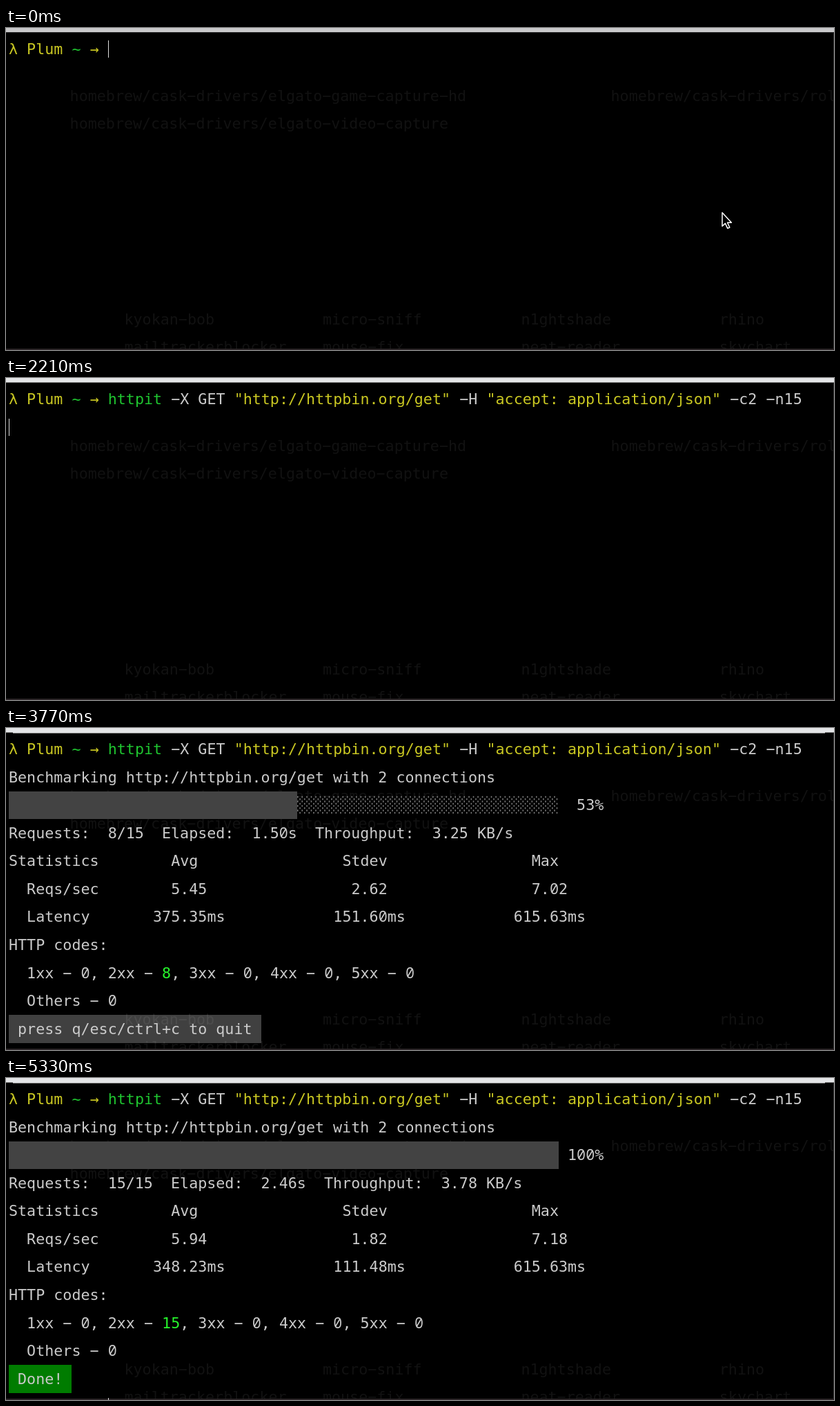
An HTML page that plays this animation: 1200x467 px, repeating every 5590 ms.

```html
<!DOCTYPE html>
<html lang="en">
<head>
<meta charset="utf-8">
<title>Terminal benchmark</title>
<style>
html, body { margin: 0; width: 100%; height: 100%; overflow: hidden; background: #000; }
#stage {
  position: relative; width: 1200px; height: 467px; overflow: hidden; background: #000;
  color: #cbcbcb; font: 21.7px/40.575px "DejaVu Sans Mono", monospace;
  font-variant-ligatures: none;
}
#stage div, svg { position: absolute; }
.cell { white-space: pre; }
.cell i { font: 21.775px/0 "Noto Sans Mono", monospace; }
.ghost { color: #111; }
.yellow { color: #c9c722; }
.green { color: #1fc430; }
.bright { color: #27f52c; }
.shade { color: #777; }
.fill { background: #434343; }
.hint { background: rgba(255, 255, 255, .25); }
.done { background: #007c00; }
.caret { width: 1px; background: #ddd; }
#top { left: 0; top: 0; width: 1200px; height: 6px; background: #c9c9cb; border-bottom: 1px solid #222; }
#top.lit { background: #e4e5e7; border-color: #777; }
#lip { left: 10px; top: 6px; width: 1177px; height: 1px; background: #e4e5e7; border-bottom: 1px solid #777; }
#right { right: 0; top: 7px; width: 1px; height: 460px; background: #333; }
#bottom { left: 0; bottom: 0; width: 1200px; height: 2px; background: #2a2426; }
</style>
</head>
<body>
<div id="stage">
  <div id="back"></div>
  <div id="right"></div>
  <div id="bottom"></div>
  <div id="screen"></div>
  <div id="top"></div>
  <div id="lip"></div>
  <svg width="1200" height="467" fill="none" stroke-linejoin="round">
    <defs>
      <path id="bar" d="M1033.4 259H1035.3Q1038 259 1038 261.5V276.5Q1038 279 1035.3 279H1033.4M1042.6 259H1040.7Q1038 259 1038 261.5M1042.6 279H1040.7Q1038 279 1038 276.5M1035.8 270.5H1040.2"/>
    </defs>
    <path id="arrow" d="M1038 267.8V287.5L1042.4 283.4L1045.8 290.6L1048.8 289.2L1045.5 282.2H1051.4Z"
      fill="#000" stroke="#fff" stroke-width="1.5"/>
    <g id="beam">
      <use href="#bar" stroke="#fff" stroke-width="4"/>
      <use href="#bar" stroke="#000" stroke-width="1.6"/>
    </g>
  </svg>
</div>
<script>
const LOOP = 5590, CW = 13.0655, CH = 40.575, X0 = 4, Y0 = 10.45;
const TOTAL = 15, BAR = 61;
const $ = id => document.getElementById(id);
const colX = c => X0 + c * CW;
const rowY = r => Y0 + r * CH;

// Long hyphens and slashed zeros
const glyphs = s => s.replace(/-/g, '\u2212').replace(/0/g, '<i>0</i>');
const put = (x, y, s, cls = '') =>
  `<div class="cell ${cls}" style="left:${x}px;top:${y}px">${glyphs(s)}</div>`;
const text = (r, c, s, cls) => put(colX(c), rowY(r) + .5, s, cls);
const box = (r, c, n, cls) =>
  `<div class="${cls}" style="left:${colX(c)}px;top:${rowY(r)}px;width:${n * CW}px;height:${CH}px"></div>`;
const caret = (r, c) =>
  `<div class="caret" style="left:${colX(c) + .3}px;top:${rowY(r) + 7.6}px;height:25px"></div>`;

function run(parts, r, c = 0) {
  return parts.map(([s, cls]) => {
    const html = text(r, c, s, cls);
    c += s.length;
    return html;
  }).join('');
}

const prompt = [['λ Plum ', 'yellow'], ['~ ', 'green'], ['→ ', 'yellow']];
const command = [['httpit', 'green'], [' -X GET '], ['"http://httpbin.org/get"', 'yellow'],
  [' -H '], ['"accept: application/json"', 'yellow'], [' -c2 -n15']];

// Three values centred on columns 20, 40 and 60
const columns = (r, label, values) => text(r, 0, label) +
  values.map((v, i) => text(r, Math.floor(20 * (i + 1) - v.length / 2), v)).join('');

function report({ n, sec, rate, reqs, lat, done }) {
  const full = Math.floor(BAR * n / TOTAL);
  const pct = Math.round(100 * n / TOTAL) + '%';
  const codes = [1, 2, 3, 4, 5].flatMap(k => [
    [`${k > 1 ? ', ' : '  '}${k}xx - `],
    k === 2 && n ? [String(n), 'bright'] : ['0']
  ]);
  const foot = done ? ' Done! ' : ' press q/esc/ctrl+c to quit ';
  return text(1, 0, 'Benchmarking http://httpbin.org/get with 2 connections') +
    (full ? box(2, 0, full, 'fill') : '') +
    text(2, full, '░'.repeat(BAR - full), 'shade') +
    text(2, 62, pct.padStart(4)) +
    text(3, 0, `Requests:  ${n}/${TOTAL}  Elapsed:  ${sec}s  Throughput:  ${rate}/s`) +
    columns(4, 'Statistics', ['Avg', 'Stdev', 'Max']) +
    columns(5, '  Reqs/sec', reqs.split(' ')) +
    columns(6, '  Latency', lat.split(' ').map(v => v + 'ms')) +
    text(7, 0, 'HTTP codes:') +
    run(codes, 8) +
    text(9, 0, '  Others - 0') +
    box(10, 0, foot.length, done ? 'done' : 'hint') +
    text(10, 0, foot);
}

const stat = (at, n, sec, rate, reqs, lat, more) => ({ at, n, sec, rate, reqs, lat, ...more });
const last = ['2.46', '3.78 KB', '5.94 1.82 7.18', '348.23 111.48 615.63'];
const steps = [
  { at: 0, caret: [0, 11], pointer: 'arrow' },
  { at: 1690, caret: [0, 11], pointer: 'beam' },
  { at: 1950, typed: true, caret: [0, 88] },
  { at: 2210, typed: true, caret: [1, 0] },
  stat(2340, 0, '0.00', '0 B', '0.00 0.00 0.00', '0.00 0.00 0.00'),
  stat(2990, 2, '0.62', '2.02 KB', '3.25 4.60 6.51', '615.55 0.11 615.63'),
  stat(3250, 4, '0.92', '2.71 KB', '4.07 3.46 6.51', '461.37 178.08 615.63'),
  stat(3510, 6, '1.21', '3.03 KB', '4.94 3.01 6.89', '404.12 165.27 615.63'),
  stat(3770, 8, '1.50', '3.25 KB', '5.45 2.62 7.02', '375.35 151.60 615.63'),
  stat(3900, 9, '1.76', '3.11 KB', '5.45 2.62 7.02', '365.72 142.93 615.63'),
  stat(4030, 10, '1.79', '3.35 KB', '5.79 2.35 7.18', '358.10 136.35 615.63'),
  stat(4420, 11, '2.08', '3.21 KB', '5.81 2.16 7.18', '354.86 129.81 615.63'),
  stat(4550, 12, '2.12', '3.38 KB', '5.83 2.06 7.18', '352.47 124.03 615.63'),
  stat(4810, 13, '2.42', '3.25 KB', '5.84 2.01 7.18', '351.72 119.28 615.63'),
  stat(4940, 14, '2.46', '3.38 KB', '5.86 1.95 7.18', '351.14 115.09 615.63'),
  stat(5070, 15, ...last, { done: true }),
  stat(5330, 15, ...last, { done: true, caret: [11, 11] })
];

function draw(s) {
  const busy = s.n !== undefined;
  $('screen').innerHTML = run(prompt, 0) +
    (busy || s.typed ? run(command, 0, 11) : '') +
    (busy ? report(s) : '') +
    (s.caret ? caret(...s.caret) : '');
  for (const id of ['arrow', 'beam']) $(id).style.display = s.pointer === id ? '' : 'none';
}

// Faint listing of the window behind
const listing = (x, y, gap, names) =>
  names.map((s, i) => put(x + i * gap * CW, y, s, 'ghost')).join('');
$('back').innerHTML =
  listing(92.6, 78.5, 60, ['homebrew/cask-drivers/elgato-game-capture-hd', 'homebrew/cask-drivers/rol']) +
  listing(92.6, 119, 60, ['homebrew/cask-drivers/elgato-video-capture']) +
  listing(171.5, 402.6, 22, ['kyokan-bob', 'micro-sniff', 'n1ghtshade', 'rhino']) +
  listing(171.5, 443.1, 22, ['mailtrackerblocker', 'mouse-fix', 'neat-reader', 'skychart']);

let shown = null;
function tick() {
  const t = performance.now() % LOOP;
  const step = steps.filter(s => s.at <= t).pop();
  if (step !== shown) draw(shown = step);
  $('top').className = t >= 1690 ? 'lit' : '';
  $('lip').style.display = t >= 2730 ? '' : 'none';
  requestAnimationFrame(tick);
}
tick();
</script>
</body>
</html>
```
